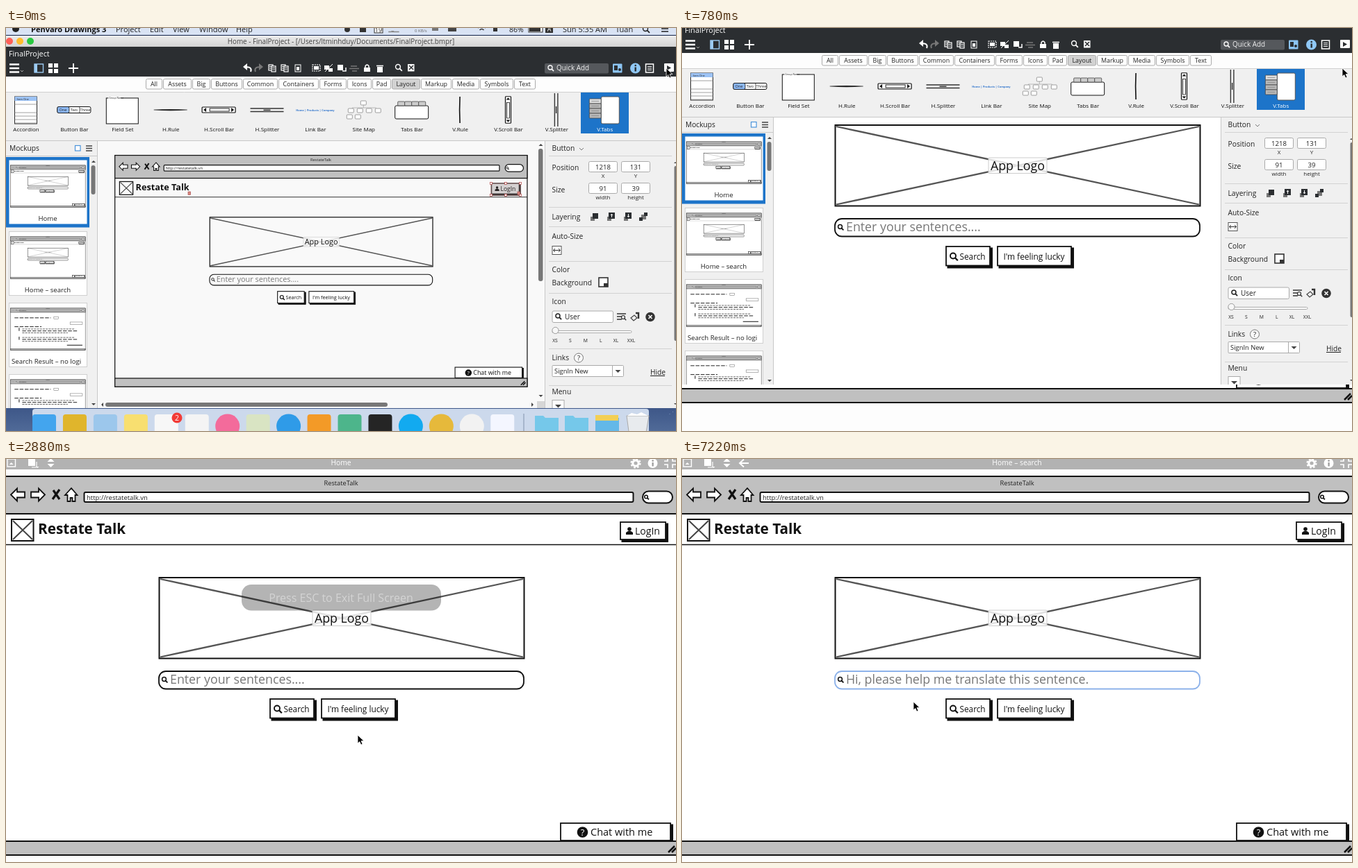
An HTML page that plays this animation: 964x581 px, repeating every 8 s.

```html
<!DOCTYPE html>
<html lang="en">
<head>
<meta charset="utf-8">
<title>Mockup preview</title>
<style>
html, body { margin: 0; height: 100%; overflow: hidden; background: #fff; }
svg { display: block; width: 100vw; height: 100vh; }
text { font-family: "Open Sans", "Noto Sans", sans-serif; font-weight: 500; white-space: pre; }
.mid { text-anchor: middle; }
.bold { font-weight: 700; }
.thumb rect { stroke-width: 4; }

.menubar, .dock, .editor, .view, .full, .before, .after, .field, .banner > *, .cursor {
  animation: 8s step-end infinite;
}
.menubar { animation-name: menubar; }
.dock { animation-name: dock; }
.editor { animation-name: editor; }
.view { animation-name: view; }
.full { animation-name: full; }
.before { animation-name: before; }
.after { animation-name: after; }
.field { animation-name: field; }
.banner > * { animation-name: banner; }
.cursor { animation-name: cursor; }

@keyframes menubar { 0% { transform: none } 6% { transform: translateY(-5px) } 7.875%, to { transform: translateY(-20px) } }
@keyframes dock { 0% { transform: none } 6% { transform: translateY(18px) } 7.875%, to { transform: translateY(50px) } }
@keyframes editor {
  0% { transform: none; opacity: 1 }
  9.75% { transform: translateY(-34px); opacity: 1 }
  14.625%, to { transform: translateY(-34px); opacity: 0 }
}
@keyframes view { 0% { opacity: 1 } 9.75%, to { opacity: 0 } }
@keyframes full {
  0% { opacity: 0; transform: translateY(-31px) }
  9.75% { opacity: 1; transform: translateY(-31px) }
  14.625%, to { opacity: 1; transform: none }
}
@keyframes before { 0% { opacity: 1 } 90.25%, to { opacity: 0 } }
@keyframes after { 0% { opacity: 0 } 90.25%, to { opacity: 1 } }
@keyframes field { 0% { stroke: #111 } 90.25%, to { stroke: #8db2ea } }
@keyframes banner {
  0% { opacity: 0 } 16.75% { opacity: 1 } 34.125% { opacity: .75 }
  36% { opacity: .42 } 37.875%, to { opacity: 0 }
}
@keyframes cursor {
  0% { transform: translate(950px, 58px) }
  21.25% { transform: translate(950px, 58px); animation-timing-function: steps(8, start) }
  36% { transform: translate(506px, 398px) }
  41.625% { transform: translate(506px, 398px); animation-timing-function: steps(7, start) }
  54.75%, to { transform: translate(333px, 350px) }
}
</style>
</head>
<body>
<svg id="stage" viewBox="0 0 964 581" xmlns="http://www.w3.org/2000/svg"></svg>
<script>
const INK = '#111', BLUE = '#1d74c9', DARK = '#2b2e31', PANEL = '#f0f0f0';

const text = (x, y, s, size, fill = '#222', cls = '') =>
  `<text x="${x}" y="${y}" font-size="${size}" fill="${fill}" class="${cls}">${s}</text>`;
const mid = (x, y, s, size, fill, cls = '') => text(x, y, s, size, fill, 'mid ' + cls);
const rect = (x, y, w, h, fill, stroke = 'none', sw = 1, rx = 0, more = '') =>
  `<rect x="${x}" y="${y}" width="${w}" height="${h}" fill="${fill}" stroke="${stroke}" stroke-width="${sw}" rx="${rx}" ${more}/>`;
const path = (d, stroke = INK, sw = 1, fill = 'none', more = '') =>
  `<path d="${d}" stroke="${stroke}" stroke-width="${sw}" fill="${fill}" ${more}/>`;
const shape = (d, fill) => path(d, 'none', 0, fill);
const disc = (x, y, r, fill, stroke = 'none', sw = 1, more = '') =>
  `<circle cx="${x}" cy="${y}" r="${r}" fill="${fill}" stroke="${stroke}" stroke-width="${sw}" ${more}/>`;
const group = (cls, body, move = '', more = '') =>
  `<g class="${cls}" ${move && `transform="${move}"`} ${more}>${body}</g>`;
const at = (x, y, body) => group('', body, `translate(${x} ${y})`);
const lens = (x, y, r, color = INK, sw = r * .45) =>
  disc(x, y, r, 'none', color, sw) + path(`M${x + r * .7} ${y + r * .7}l${r} ${r}`, color, sw * 1.2);
const down = (x, y, s = 3, fill = '#444') => shape(`M${x - s} ${y}h${2 * s}l${-s} ${s}z`, fill);
const up = (x, y, s = 3, fill = '#444') => shape(`M${x - s} ${y}h${2 * s}l${-s} ${-s}z`, fill);
const range = n => [...Array(n).keys()];

// ---- the sketched web page ----
const button = (x, y, w, h) =>
  rect(x + 2, y + 2, w + 1.5, h + 1.5, INK, INK, 1) + rect(x, y, w, h, '#fff', INK, 1.8);

const browser = (body, paper = '#fff') =>
  rect(-3, 25, 971, 546, paper, INK, 2) +
  rect(-3, 25, 971, 54, '#c0c0c0', INK, 2) +
  mid(482, 38, 'RestateTalk', 9.3) +
  path('M7 51.5l9-9v5h11v8h-11v5z', INK, 1.8, '#fff') +
  path('M56 51.5l-9-9v5h-11v8h11v5z', INK, 1.8, '#fff') +
  path('M68 45l9 13M77 44l-10 14', INK, 3.2) +
  path('M85 52l9-10 8.5 10h-3v9h-4v-5h-3v5h-4v-9z', INK, 1.8, '#fff') +
  rect(112.5, 48, 790, 14, '#fff', INK, 2, 2) +
  text(116, 58.5, 'http://restatetalk.vn', 9.5) +
  rect(916, 46.5, 43, 17, '#fff', INK, 2, 8.5) + lens(921, 54.5, 2.3, INK, 1.5) +
  body +
  rect(-3, 551, 971, 20, '#c0c0c0', INK, 2) +
  path('M953 567l9-9M958 567l6-6', INK, 2.5);

const home = (paper = '#fff') =>
  rect(8, 87, 31.5, 31, paper, INK, 2) + path('M10 89l28 27M38 89l-28 27', '#444', 2) +
  text(46, 108, 'Restate Talk', 20.7, INK, 'bold') +
  path('M-3 123.5H968', INK, 1.4) +
  button(884, 91, 65, 25) +
  disc(897, 101, 2.8, INK) + shape('M892 109v-3q5-5 10 0v3z', INK) +
  text(905, 108.5, 'LogIn', 14, INK) +
  rect(220.5, 171, 525, 116.5, paper, INK, 2) +
  path('M222 173L744 285.5M744 173L222 285.5', '#555', 2.3) +
  rect(441, 218, 84, 22.5, paper, '#ccc', 1, 1, 'fill-opacity=".82"') +
  mid(483, 235.5, 'App Logo', 17.8, INK) +
  rect(220, 306, 525, 25.5, paper, INK, 1.8, 10, 'class="field"') +
  lens(227.5, 317.5, 2.9, INK, 1.5) +
  text(236, 324, 'Enter your sentences....', 17.8, '#777', 'before') +
  text(236, 324, 'Hi, please help me translate this sentence.', 17.8, '#777', 'after') +
  button(380, 346, 63, 27.5) + lens(390, 359.5, 4, INK, 1.9) + text(399.5, 364.5, 'Search', 11.8, INK) +
  button(454, 346, 106, 27.5) + mid(506.5, 364.5, 'I\'m feeling lucky', 11.9, INK) +
  button(798, 525, 158, 25) + disc(829.5, 538, 7.8, INK) + mid(829.5, 543, '?', 13, '#fff') +
  text(841, 543, 'Chat with me', 14.5, INK);

const results = () =>
  path('M50 150H520M50 265H400M150 320H860M150 430H860', '#222', 9, 'none', 'stroke-dasharray="50 16"') +
  path('M150 295H830M150 345H740M150 405H830M150 455H740', '#555', 8, 'none', 'stroke-dasharray="28 10"') +
  rect(560, 135, 60, 30, '#fff', '#555') + rect(770, 205, 160, 34, '#fff', '#555') +
  path('M110 280v40M110 395v40M730 505H930', INK, 9);

// ---- editor window ----
const icons = () => {
  const W = '#fff', G = '#777';
  const page = (x, y) => rect(x, y, 6, 8, DARK, W, 1.2) + path(`M${x + 1} ${y + 2.5}h4m-4 2.5h4`, W, .9);
  const pages = x => page(x - 5, 53) + page(x - 1, 55);
  return path('M5 52.5h14M5 58h14M5 63.5h14', W, 2.6) + path('M21 61l2 2 2-2', '#aaa') +
    rect(41, 52, 12.5, 12, DARK, '#9ccbf3', 1.4) + rect(41, 52, 4, 12, '#9ccbf3') +
    [61, 69].map(x => rect(x, 51, 6, 6, W) + rect(x, 59, 6, 6, W)).join('') +
    path('M90 58h14M97 51v14', W, 1.8) +
    path('M352 63q3-7-8-7', W, 2) + shape('M341 56l6-5v10z', W) +
    path('M359 63q-3-7 8-7', G, 2) + shape('M370 56l-6-5v10z', G) +
    pages(383) + pages(401) + rect(416, 53, 8, 10, DARK, W) + rect(418, 56, 4, 5, W) +
    rect(441, 53, 11, 9, DARK, W, 1.2, 0, 'stroke-dasharray="2 1"') + rect(443, 55, 7, 5, W) +
    rect(458, 54, 7, 6, W) + rect(464, 58, 6, 5, W) + path('M459 63l11-11', W) +
    rect(477, 53, 8, 8, W) + path('M484 62h5v-5', W, 1.5) +
    path('M496 55h9M494 58.5h14M498 62h7', G, 1.5) +
    rect(515, 57, 9, 6, W) + path('M517 57v-2q2.5-4 5 0v2', W, 1.5) +
    path('M533 54.5h10', W, 1.6) + rect(534, 56, 8, 8, W) +
    lens(564, 56, 3.4, W, 1.5) + rect(578, 52, 9.5, 10.5, W) + path('M580 54l6 6M586 54l-6 6', DARK, 1.6) +
    rect(775, 51, 92, 14.5, '#55585c', 'none', 0, 2) + lens(783, 57, 3, W, 1.3) + text(792, 61, 'Quick Add', 9.9, '#eee') +
    rect(873, 51.5, 13.5, 13, '#8cc4f2', 'none', 0, 1) + rect(875, 54, 5, 7, DARK) + disc(883, 60, 2, DARK) +
    disc(905.5, 58, 7.5, '#90c8f5') + rect(904.5, 56.5, 2.4, 6, DARK) + disc(905.7, 54, 1.3, DARK) +
    rect(920.5, 52, 11, 12, DARK, W, 1.5) + path('M923 55.5h6M923 58h6M923 60.5h6', W) +
    rect(947, 51, 14, 12, W, 'none', 0, 1) + shape('M951 54l6 3.5-6 3.5z', DARK);
};

const tabs = () => {
  const names = 'All,Assets,Big,Buttons,Common,Containers,Forms,Icons,Pad,Layout,Markup,Media,Symbols,Text'.split(',');
  const starts = [201, 226, 268, 295, 341, 392, 451, 491, 527, 555, 597, 642, 682, 731, 763];
  return names.map((name, i) => {
    const x = starts[i], w = starts[i + 1] - x - 2;
    return rect(x + .5, 73.5, w, 14.5, name === 'Layout' ? '#d2d2d2' : '#fff', '#aaa', 1, 2) +
      mid(x + w / 2 + .5, 84, name, 8.9);
  }).join('');
};

const palette = () => {
  const bar = (w, h) => rect(-w / 2, -h / 2, w, h, '#fff', INK, 1.2, 1);
  const rows = (x, y, n, gap, w) => range(n).map(i => path(`M${x} ${y + i * gap}h${w}`, '#888', .8)).join('');
  const tabStrip = x => range(4).map(i => rect(x + i * 10, -12, 10, 6, '#ccc', '#444', .8, 1)).join('');
  const slider = bar(48, 8) + rect(-13, -2, 28, 4, '#fff', INK, .9) + shape('M-22 0l4-3v6zM22 0l-4-3v6z', INK);
  const splitter = path('M-24-2h48M-24 2.5h48', '#333', 1.4) + path('M-5 .3h10', INK, 1.2);
  const turn = body => group('', body, 'rotate(90)');
  const node = (x, y) => rect(x - 4, y - 3, 8, 6, '#fff', '#888', .8, 1);
  const items = {
    'Accordion': rect(-16, -19, 32, 39, '#fff', INK, .9) + rect(-16, -19, 32, 6, '#9dc3f5') + rows(-16, -8, 1, 5, 32) + rows(-16, 4, 4, 5, 32) + text(-13, -14, 'Item One', 4),
    'Button Bar': rect(-24, -4.5, 48, 9, '#fff', INK, 1, 2) + rect(-24, -4.5, 17, 9, '#8db9f5', INK, .8, 2) + path('M8-4v9', INK, .7) + mid(-16, 2, 'One', 5.5) + mid(0, 2, 'Two', 5.5) + mid(16, 2, 'Three', 5.5),
    'Field Set': rect(-23, -17, 46, 37, '#fff', INK, 1) + rect(-20, -19, 18, 4, '#fff') + text(-19, -16, 'Group Name', 3.5),
    'H.Rule': shape('M-24 0Q0-2 24 0Q0 2.5-24 0z', INK) + path('M-24 0h48', '#444', .9),
    'H.Scroll Bar': slider,
    'H.Splitter': splitter,
    'Link Bar': mid(0, 2, 'Home | Products | Company', 3.9, '#2f74cc', 'bold'),
    'Site Map': path('M0-10v7M-16 4v-7h34v7', '#aaa', .8) + node(0, -10) + range(4).map(i => node(-18 + i * 13, 1)).join('') + node(-20, 10) + node(-8, 10),
    'Tabs Bar': rect(-24, -6, 48, 19, '#fff', INK, 1, 2) + tabStrip(-20),
    'V.Rule': path('M0-19Q-1 0 0 19', INK, 1.6),
    'V.Scroll Bar': turn(group('', slider, 'scale(.8 1)')),
    'V.Splitter': turn(splitter),
    'V.Tabs': rect(-5, -19, 26, 39, '#fff', '#555', 1, 2) + range(4).map(i => rect(-22, -16 + i * 7, 17, 7, i ? '#b8b8b8' : '#ddd', '#444', .8, 1) + rows(-19, -12.5 + i * 7, 1, 1, 11)).join('')
  };
  return rect(827, 93, 69, 59, BLUE) + Object.entries(items).map(([name, art], i) =>
    at(28.5 + 69.4 * i, 118, art + mid(.5, 31, name, 8, i === 12 ? '#fff' : INK))).join('');
};

const thumbs = () =>
  text(5, 176.5, 'Mockups', 10.2) + rect(99.5, 169.5, 7.5, 7.5, '#fff', '#4a93da', 1.2) +
  path('M115 170h9M115 173.5h9M115 177h9', '#444', 1.3) +
  rect(0, 186, 120, 101.5, BLUE) +
  ['Home', 'Home – search', 'Search Result – no login', ''].map((name, i) => {
    const y = 190 + 103 * i;
    return rect(4.5, y + .5, 112, 92, '#fff', i ? '#d0d0d0' : 'none') +
      group('thumb', browser(i < 2 ? home() : results()), `translate(6.7 ${y + 5.2}) scale(.111)`) +
      (i === 2 ? text(8, y + 88, name.slice(0, 23), 9.6) : mid(60, y + 88, name, 9.6));
  }).join('') +
  rect(117, 288, 14, 260, PANEL) +
  rect(122.5, 198, 6, 42, '#777', 'none', 0, 3) + up(126, 194, 3) + down(126, 541, 3);

const inspector = () => {
  const label = (y, s) => text(785.5, y, s, 10.3);
  const number = (x, y, value, unit) =>
    rect(x + .5, y + .5, 41, 15, '#fff', '#aaa', 1, 2) + mid(x + 21, y + 11.5, value, 9.6) + mid(x + 21, y + 24, unit, 8);
  const rule = y => path(`M781 ${y}.5H958`, '#d2d2d2');
  return label(177, 'Button') + path('M825 173l3 3 3-3', '#777') + [184, 258, 286, 336, 382, 462, 515].map(rule).join('') +
    label(204.5, 'Position') + number(838, 192, 1218, 'X') + number(885, 192, 131, 'Y') +
    label(236.5, 'Size') + number(838, 223, 91, 'width') + number(885, 223, 39, 'height') +
    label(276, 'Layering') +
    rect(841, 272, 6, 6, '#777') + rect(844, 267, 8, 8, DARK) +
    [870, 894].map((x, i) => rect(x - 5, 272, 6, 6, '#777') + rect(x - 3, 266, 9, 9, DARK) + path(`M${x + 1.5} 268v5`, '#fff') + (i ? down : up)(x + 1.5, i ? 271 : 270, 2, '#fff')).join('') +
    rect(914, 269, 7, 7, '#777') + rect(918, 266, 5, 5, DARK) + rect(911, 273, 5, 5, DARK) +
    label(304, 'Auto-Size') + rect(786, 314.5, 13, 12, '#fff', '#555') + path('M788 320.5h9M790 318l-2.5 2.5 2.5 2.5M795 318l2.5 2.5-2.5 2.5', '#333') +
    label(352, 'Color') + label(370.5, 'Background') + rect(853, 360, 13, 13, '#fff', '#333', 1.6) + shape('M860 373v-5h6v5z', '#333') +
    label(398, 'Icon') + rect(786, 408, 87.5, 16.5, '#fff', '#aaa', 1, 2) + lens(794, 415, 3, '#222', 1.5) + text(804, 419.5, 'User', 10) +
    path('M879 412h13M879 416h7M879 420h7', '#333', 1.3) + lens(888, 417, 2.5, '#333', 1.2) +
    path('M899 418l5-4 4 4-5 4z', '#444', 1.2) + path('M906 411h4v8', '#333', 2.4) +
    disc(927, 416.5, 6.8, '#333') + path('M924.5 414l5 5M929.5 414l-5 5', '#fff', 1.6) +
    rect(786, 436.5, 114, 3, '#fff', '#aaa', 1, 1.5) + disc(790.5, 436, 4.6, '#f7f7f7', '#999') +
    'XS,S,M,L,XL,XXL'.split(',').map((s, i) => mid(790 + 21.9 * i, 453, s, 6.8)).join('') +
    label(479, 'Links') + disc(824, 475.5, 6.5, '#fafafa', '#777') + mid(824, 479, '?', 9.5) +
    rect(786, 486.5, 102.5, 16, '#fff', '#aaa', 1, 1) + path('M872.5 487v16', '#aaa') + down(880.5, 493, 4) + text(789, 498, 'SignIn New', 9.4) +
    text(927, 500, 'Hide', 10.2) + path('M927 501.5h21', '#222') +
    label(528, 'Menu') + rect(786, 536.5, 17, 16, '#fff', '#aaa') + down(794.5, 543, 4.5) +
    rect(961.5, 199, 5, 252, '#777', 'none', 0, 2) + up(963, 195, 2) + down(963, 541, 2);
};

const view = () => {
  const paper = '#f9f9f9';
  return rect(131, 162, 644, 386, paper) +
    group('', browser(home(paper), paper), 'translate(158.5 168.3) scale(.611)') +
    rect(698, 224, 42, 17, '#665858', '#866', 1, 0, 'fill-opacity=".28"') +
    [698, 719, 740].map(x => [224, 241].map(y => rect(x - 1.5, y - 1.5, 3, 3, '#fff', '#b55', .8)).join('')).join('') +
    [[262, 236], [736, 236]].map(([x, y]) => rect(x, y, 3.5, 4.5, '#d98880', '#a55', .7)).join('') +
    rect(766, 174, 6.5, 191, '#777', 'none', 0, 3) + up(769.5, 170, 3) + down(769.5, 529, 3) +
    rect(143, 540, 406, 6, '#777', 'none', 0, 3) + shape('M140 540v6l-3-3zM756 540v6l3-3z', '#444') +
    rect(764, 538, 11, 10, '#d6d6d6');
};

const editor = () =>
  rect(0, 11, 964, 17, 'url(#bar)') + ['#ff5f57', '#ffbd2e', '#28c940'].map((c, i) => disc(5 + 15 * i, 19, 5, c)).join('') +
  mid(482, 23, 'Home - FinalProject - [/Users/ltminhduy/Documents/FinalProject.bmpr]', 9.9, '#444') +
  rect(0, 27, 964, 43, DARK) + text(4, 41, 'FinalProject', 10.8, '#fff') + icons() +
  rect(0, 70, 964, 22, '#fdfdfd') + tabs() +
  rect(0, 92, 964, 70, PANEL) + path('M0 92.5h964', '#d0d0d0') + palette() +
  group('view', view()) +
  rect(0, 162, 131, 386, PANEL) + rect(775, 162, 189, 386, PANEL) +
  path('M0 162.5H964M131.5 162v386M775.5 162v386M0 184.5H131', '#c8c8c8') +
  thumbs() + inspector();

// ---- desktop ----
const menubar = () =>
  rect(0, -10, 964, 20, '#d9e3f4') + disc(14, 1, 5, '#222') +
  text(36, 6, 'Penvaro Drawings 3', 11, INK, 'bold') +
  Object.entries({ Project: 158, Edit: 207, View: 240, Window: 278, Help: 331 }).map(([s, x]) => text(x, 6, s, 11)).join('') +
  disc(491, 2, 4, '#333') + rect(509, -3, 9, 9, '#333') +
  rect(530, -4, 12, 11, '#fff', '#333') + mid(536, 6, '19', 9) +
  mid(558, 5, '▂▃▂▂', 5, '#888') + text(588, 6, '0 KB/s', 6, '#666') + rect(613, -3, 9, 7, '#777') + rect(636, -2, 12, 7, '#444') +
  path('M679 0q5.5-5 11 0M681.5 3q3-3 6 0', '#333', 1.6) + rect(701, 0, 6, 5, '#333') +
  text(724, 6, '86%', 10.6) + rect(752, -3, 20, 9, '#fff', '#333') + rect(753, -2, 16, 7, '#333') + rect(776, -4, 11, 11, '#333') + mid(781.5, 5, 'A', 9, '#fff') +
  text(801, 6, 'Sun 5:35 AM', 11) + text(877, 6, 'Tuan', 11) + lens(920, 1, 3.5, '#222', 1.4) + path('M943 1h10M943 5h10', '#222', 1.6);

const dock = () => {
  const colors = ['#43a5ee', '#e0b52c', '#9cc7ec', '#f8df70', '#f7f7f7', '#f4f4f4', '#f36b9b', '#d9e4c3', '#2f9be8',
    '#f39a27', '#4db58b', '#252525', '#12aaf0', '#e6b93b', '#f2f2f2', '#f4f6ff'];
  const round = [6, 8, 12, 13, 14];
  return rect(38, 549, 887, 60, '#ccd9ec', 'none', 0, 4) +
    colors.map((c, i) => {
      const x = 55 + 43.95 * i;
      return round.includes(i) ? disc(x, 574, 17.5, c) : rect(x - 17, 557, 34, 34, c, 'none', 0, 4);
    }).join('') +
    disc(246, 562, 7.5, '#f23b36') + mid(246, 566, '2', 10.5, '#fff') + path('M745 556v25', '#8292ac') +
    [778, 821, 865].map((x, i) => shape(`M${x - 17} 591v-32h12l3 3h19v29z`, i < 2 ? '#75c8ea' : '#63b8e8')).join('') +
    rect(848, 558, 33, 8, '#f3cf55') + path('M893 559l4 30h23l5-30z', '#aaa', 1, '#e8ebee') +
    shape('M894 559l6-4 8 2 6-3 10 5z', '#fff');
};

const desktop = () =>
  rect(0, 0, 964, 581, 'url(#night)') +
  range(50).map(i => disc((i * 137.5) % 964, i % 3 ? (i * 3.7) % 11 : 550 + (i * 7.3) % 30, .5, '#8ea4cc')).join('');

// ---- full screen preview ----
const toolbar = () => {
  const W = '#fff';
  return rect(0, -30, 964, 45, '#b2b2b2') +
    rect(2, 0, 11.5, 11, 'none', W, 1.4) + up(7.7, 8, 3, W) +
    rect(32, -1, 10, 11, W) + path('M37 12h7v-8', W, 1.2) + down(45.5, 11, 2, W) +
    up(64.5, 4, 5, W) + down(64.5, 7, 5, W) +
    path('M96 6H84M89 .5l-6 5.5 6 5.5', W, 2, 'none', 'class="after"') +
    mid(482, 8.5, 'Home', 10.3, W, 'before') + mid(482, 8.5, 'Home – search', 10.3, W, 'after') +
    disc(906, 6, 4.2, 'none', W, 3.2) + disc(906, 6, 6.5, 'none', W, 2.2, 'stroke-dasharray="2.6 2.5"') +
    disc(930.5, 6, 7, W) + rect(929.5, 5, 2.2, 5.5, '#999') + disc(930.6, 2.5, 1.3, '#999') +
    path('M947 3h5v-5M964 3h-5v-5M947 8h5v5M964 8h-5v5', W, 1.6);
};

document.getElementById('stage').innerHTML = `
  <defs>
    <linearGradient id="bar" x2="0" y2="1"><stop stop-color="#ececec"/><stop offset="1" stop-color="#d2d2d2"/></linearGradient>
    <linearGradient id="night" x2="0" y2="1"><stop stop-color="#12234a"/><stop offset=".9" stop-color="#30497c"/><stop offset="1" stop-color="#506a98"/></linearGradient>
    <clipPath id="window"><rect y="11" width="964" height="537"/></clipPath>
  </defs>` +
  desktop() +
  group('full', rect(0, -30, 964, 660, '#fdfdfd') + toolbar() + browser(home())) +
  group('editor', editor(), '', 'clip-path="url(#window)"') +
  group('menubar', menubar()) + group('dock', dock()) +
  group('banner', rect(339, 181, 287, 37.5, '#000', 'none', 0, 14, 'fill-opacity=".7"') +
    mid(482, 205.5, 'Press ESC to Exit Full Screen', 16, '#fff')) +
  group('cursor', path('M0 0v12l2.8-2.5 2 4.5 2.2-1-2-4.4h4z', '#fff', .8, '#000'));
</script>
</body>
</html>
```
